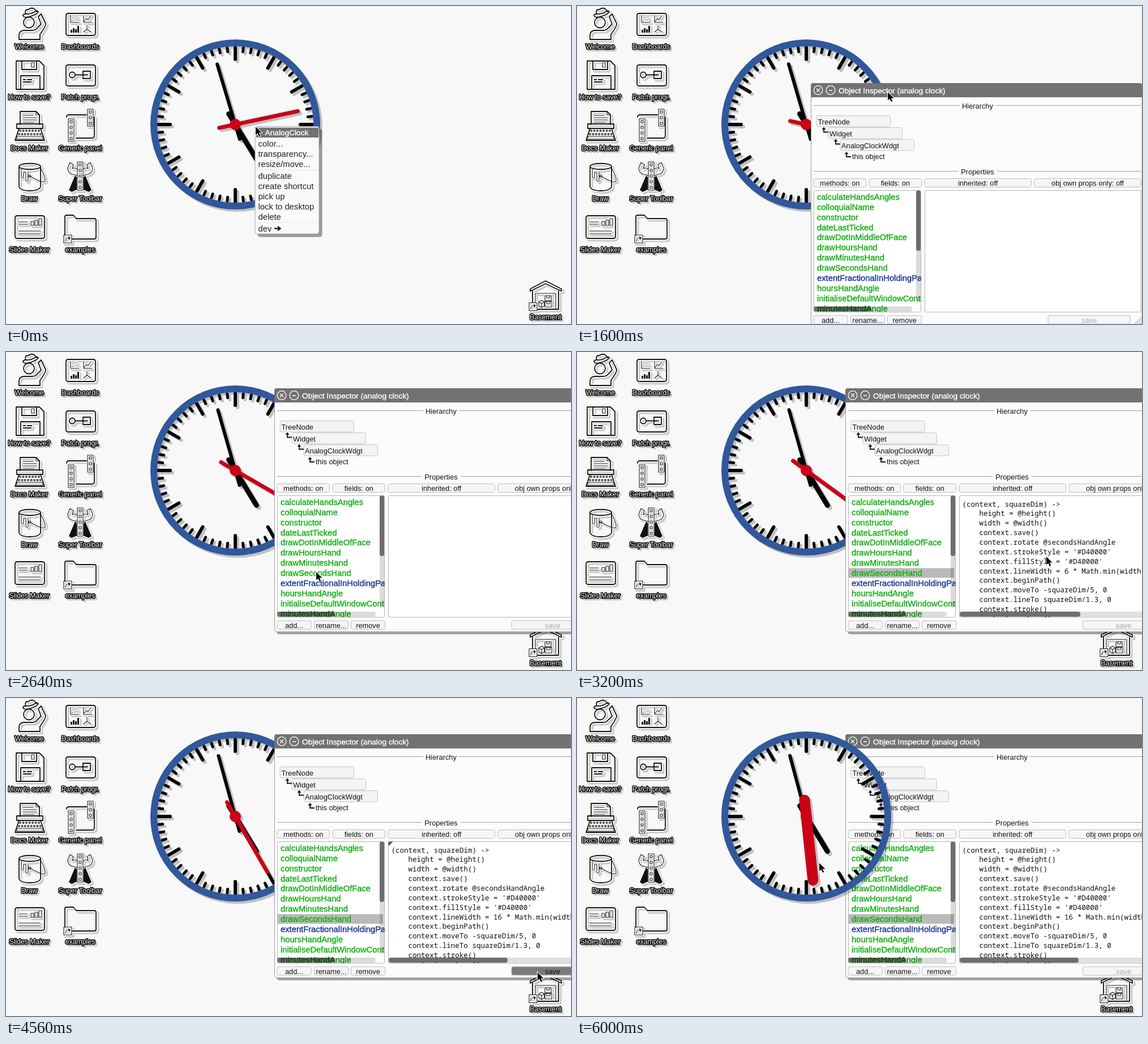
Animation, 998 px wide and 561 px high, one loop 6080 ms. Source, as an HTML page with a canvas:

```html
<!DOCTYPE html>
<html lang="en">
<head>
<meta charset="utf-8">
<title>Analog clock desktop</title>
<style>
html, body { margin: 0; width: 100%; height: 100%; overflow: hidden; background: #f8f8f8; }
canvas { display: block; }
</style>
</head>
<body>
<canvas id="stage" width="998" height="561"></canvas>
<script>
const W = 998, H = 561, LOOP = 6080, STEP = 80, TAU = Math.PI * 2;
const SANS = '"Liberation Sans", Arial, sans-serif';
const MONO = '"Noto Sans Mono", "DejaVu Sans Mono", monospace';
const stage = document.getElementById('stage').getContext('2d');

function makeLayer() {
  const c = document.createElement('canvas');
  c.width = W;
  c.height = H;
  return c.getContext('2d');
}
const scratch = makeLayer();

// Draws a group on its own layer, then places it with one hard shadow.
function withShadow(target, offset, alpha, draw) {
  scratch.clearRect(0, 0, W, H);
  scratch.save();
  draw(scratch);
  scratch.restore();
  target.save();
  target.shadowColor = `rgba(0,0,0,${alpha})`;
  target.shadowOffsetX = target.shadowOffsetY = offset;
  target.drawImage(scratch.canvas, 0, 0);
  target.restore();
}

function text(g, str, x, y, size, color = '#111', align = 'left', family = SANS) {
  g.font = `${size}px ${family}`;
  g.textAlign = align;
  g.fillStyle = color;
  g.fillText(str, x, y + size * 0.36);
}

// Text with slightly thickened stems.
function heavy(g, str, x, y, size, color, align) {
  text(g, str, x, y, size, color, align);
  g.strokeStyle = color;
  g.lineWidth = 0.4;
  g.strokeText(str, x, y + size * 0.36);
}

function panel(g, x, y, w, h, r, fill, edge) {
  g.beginPath();
  g.roundRect(x, y, w, h, r);
  g.fillStyle = fill;
  g.fill();
  if (edge) {
    g.strokeStyle = edge;
    g.lineWidth = 1;
    g.stroke();
  }
}

function line(g, x1, y1, x2, y2, width, color) {
  g.beginPath();
  g.moveTo(x1, y1);
  g.lineTo(x2, y2);
  g.lineWidth = width;
  g.strokeStyle = color;
  g.stroke();
}

function disc(g, x, y, r, color) {
  g.beginPath();
  g.arc(x, y, r, 0, TAU);
  g.fillStyle = color;
  g.fill();
}

// ---- Desktop icons ----
const box = (x, y, w, h) => `M${x} ${y}h${w}v${h}h${-w}z`;
const round = (x, y, w, h, r = 4) =>
  `M${x + r} ${y}h${w - 2 * r}q${r} 0 ${r} ${r}v${h - 2 * r}q0 ${r} ${-r} ${r}h${2 * r - w}q${-r} 0 ${-r} ${-r}v${2 * r - h}q0 ${-r} ${r} ${-r}z`;
const ring = (x, y, r) => `M${x - r} ${y}a${r} ${r} 0 1 0 ${2 * r} 0a${r} ${r} 0 1 0 ${-2 * r} 0z`;
const repeat = (n, f) => Array.from({ length: n }, (_, i) => f(i)).join('');
const strip = (x, y, n) => box(x, y, 10, n * 10) + repeat(n, i => box(x + 3, y + 3 + i * 10, 4, 4));
const badge = (x, y) => ({
  thin: box(x, y, 14, 14) + `M${x + 3} ${y + 11}q0 -6 6 -6`,
  fill: `M${x + 8} ${y + 2}l4 3l-3 4z`
});
const folderBadge = badge(102, 404), houseBadge = badge(924, 523.5);

const icons = [
  { name: 'Welcome', x: 41, y: 72,
    bold: 'M23 59V52Q23 44 31 43H46Q52 43 55 39L62 32L57 19L62 14L70 31Q71 35 60 50V59Z' + ring(40.5, 29, 9.5)
      + 'M35 14Q32 6 40 6Q44 2 50 5L54 10M30 17Q32 22 44 18T57 10Q55 7 51 10Q43 15 35 14Q30 14 30 17' },
  { name: 'Dashboards', x: 131, y: 72, bold: round(106, 13, 52, 39),
    thin: 'M114 16V29H129M137 16V29H152M138 27L142 22L145 24L150 17M143 34V41L137 46M143 41L150 46',
    fill: box(114, 42, 3, 5) + box(118, 39, 3, 8) + box(122, 41, 3, 6) + box(126, 35, 3, 12)
      + repeat(7, i => ring(117 + i * 1.7, 26 - (i * 5) % 9, 0.8)) },
  { name: 'How to save?', x: 41, y: 161, bold: 'M18 97H59L67 105V147H18ZM28 97V112H54V97M26 147V123H60V147',
    thin: box(45, 100, 5, 8), fill: box(30, 129, 5, 2) + box(37, 129, 9, 2) + box(30, 133, 15, 2) },
  { name: 'Patch progr.', x: 131, y: 161,
    bold: round(106, 104, 52, 37) + ring(117, 121.5, 5) + 'M122 121.5H144' + box(136, 115, 13, 13) },
  { name: 'Docs Maker', x: 41, y: 251,
    bold: 'M25 209V186H53L59 192V209M19 208H65V216H19ZM23 216L16 237H68L61 216',
    thin: 'M53 186V192H59M30 193H48M30 197H54M30 201H54M30 205H50' + box(19, 230, 46, 5)
      + repeat(7, i => ring(25 + i * 5.5, 220, 1.4)) + repeat(8, i => ring(23 + i * 5.4, 226, 1.4)) },
  { name: 'Generic panel', x: 131, y: 251, bold: 'M111 192H142M156 196V229Q156 233 152 233H124M107 196Q107 192 111 192',
    thin: strip(110, 199, 4) + strip(144, 182, 3) },
  { name: 'Draw', x: 41, y: 340,
    bold: 'M23 283V319Q26 326 42 326Q58 326 61 319V283M23 283C23 276 61 276 61 283C61 290 23 290 23 283Z',
    thin: 'M61 286Q70 301 69 309Q66 314 42 300M27 288V302Q29 305 31 302V294Q33 292 35 294V308Q37 311 39 308V292'
      + ring(42, 300, 2) },
  { name: 'Super Toolbar', x: 131, y: 340, thin: strip(126, 275, 5)
      + 'M126 288Q121 284 117 287L119 280L113 276L109 286Q109 295 118 297L126 299M136 288Q141 284 145 287L143 280L149 276L153 286Q153 295 144 297L136 299',
    fill: 'M122 299L125 302V324L116 328L111 325ZM140 299L137 302V324L146 328L151 325Z' },
  { name: 'Slides Maker', x: 41, y: 430, bold: round(16, 370, 52, 40),
    thin: 'M22 381H38M22 385H38M22 397H61M22 402H61' + box(44, 380, 5, 7) + box(51, 378, 5, 9) + box(58, 375, 5, 12) },
  { name: 'examples', x: 131, y: 430,
    bold: 'M104 404V372Q104 369 107 369H119L124 375H156Q159 375 159 378V408Q159 411 156 411H117', ...folderBadge },
  { name: 'Basement', x: 953, y: 548.5,
    bold: 'M926 503V499L953 485L981 499V503L953 490ZM930 503V523M976 503V535H939',
    thin: 'M935 523V507H971V533' + box(952, 511, 11, 9) + box(952, 521, 12, 10)
      + 'M955 511V515H960V511M955 521V525H961V521M941 522L946 519L951 522V529L946 532L941 529ZM941 522L946 525L951 522M946 525V532' + houseBadge.thin,
    fill: houseBadge.fill }
];

function drawIcon(g, icon) {
  g.lineJoin = g.lineCap = 'round';
  const bold = new Path2D(icon.bold || ''), thin = new Path2D(icon.thin || ''), fill = new Path2D(icon.fill || '');
  const ink = (path, width, color) => {
    g.strokeStyle = color;
    g.lineWidth = width;
    g.stroke(path);
  };
  ink(bold, 5, '#fff');
  ink(thin, 4, '#fff');
  ink(fill, 3, '#fff');
  ink(bold, 1.8, '#111');
  ink(thin, 1.1, '#111');
  g.fillStyle = '#111';
  g.fill(fill);
  g.font = `12.3px ${SANS}`;
  g.textAlign = 'center';
  g.lineWidth = 3;
  g.strokeStyle = '#000';
  g.strokeText(icon.name, icon.x, icon.y + 12.3 * 0.36);
  text(g, icon.name, icon.x, icon.y, 12.3, '#fff', 'center');
}

const desktop = makeLayer();
desktop.fillStyle = '#f8f8f8';
desktop.fillRect(0, 0, W, H);
withShadow(desktop, 3, 0.18, g => icons.forEach(i => drawIcon(g, i)));

// ---- Clock ----
function hand(g, turn, tail, tip, width, color) {
  g.save();
  g.rotate(turn * TAU - TAU / 4);
  line(g, -tail, 0, tip, 0, width, color);
  g.restore();
}

function drawClock(g, t) {
  const sec = 13 + Math.floor((t + 30) / 370);
  const min = 57 + sec / 60, hour = 4 + min / 60;
  g.translate(405, 209);
  g.lineCap = 'round';
  for (let i = 0; i < 60; i++) {
    const big = i % 5 === 0;
    hand(g, i / 60, big ? -115 : -129, 136, big ? 6 : 5, '#050505');
  }
  g.beginPath();
  g.arc(0, 0, 144, 0, TAU);
  g.lineWidth = 12;
  g.strokeStyle = '#30589b';
  g.stroke();
  hand(g, hour / 12, 22, 72, 9, '#050505');
  hand(g, min / 60, 27, 111, 6, '#050505');
  hand(g, sec / 60, 29, 113, t >= SAVED ? 19 : 7, '#ca0317');
  disc(g, 0, 0, 10, '#ca0317');
}

// ---- Timeline ----
const OPEN = 1120, GRAB = 1600, DROP = 1920, PICK = 2720, CARET = 3600,
  TYPE = 3920, PRESS = 4480, SAVED = 4640, RAISE = 5520;

const pointer = [
  [0, 441, 213], [80, 441, 213], [560, 493, 391], [720, 493, 391], [960, 515, 421], [OPEN, 515, 421],
  [1440, 549, 152], [GRAB, 549, 152], [DROP, 610, 80], [2080, 584, 174], [2480, 548, 388], [2800, 548, 388],
  [3200, 829, 361], [3440, 862, 386], [4000, 862, 386], [4400, 939, 484], [4720, 939, 484],
  [5360, 428, 291], [LOOP, 428, 291]
];

function pointerAt(t) {
  const i = pointer.findIndex(p => p[0] > t);
  const [t0, x0, y0] = pointer[i - 1], [t1, x1, y1] = pointer[i];
  const k = (t - t0) / (t1 - t0), e = k * k * (3 - 2 * k);
  return [x0 + (x1 - x0) * e, y0 + (y1 - y0) * e];
}

function drawPointer(g, x, y) {
  const p = new Path2D('M0 0V14.5L3.4 11.4L6 17L8.3 16L5.8 10.5H10.5Z');
  g.save();
  g.translate(x, y);
  g.lineWidth = 2;
  g.strokeStyle = '#fff';
  g.stroke(p);
  g.fillStyle = '#000';
  g.fill(p);
  g.restore();
}

// ---- Menus ----
const mainMenu = { title: 'AnalogClock', size: 13.7, x: 440, y: 212.5, w: 113, h: 189.5, rules: [289.5, 382],
  rows: [['color...', 243], ['transparency...', 261], ['resize/move...', 279], ['duplicate', 300],
    ['create shortcut', 318], ['pick up', 336], ['lock to desktop', 354], ['delete', 371.5], ['dev', 392.5]] };
const devMenu = { title: 'Dev Tools', size: 13, x: 492, y: 390.5, w: 69, h: 56, rules: [],
  rows: [['inspect', 420.5], ['console', 438]] };

function drawMenu(g, m, hover) {
  panel(g, m.x, m.y, m.w, m.h, 4, '#fafafa', '#a8a8a8');
  panel(g, m.x + 2, m.y + 2, m.w - 3, 17.5, [3, 3, 0, 0], '#727272');
  heavy(g, m.title, m.x + m.w / 2 - 0.5, m.y + 11, m.size, '#fff', 'center');
  m.rules.forEach(y => line(g, m.x + 2, y, m.x + m.w - 2, y, 1, '#e4e4e4'));
  for (const [label, y] of m.rows) {
    if (hover(label, y)) {
      g.fillStyle = '#bdbdbd';
      g.fillRect(m.x + 1, y - 8.5, m.w - 2, 17.5);
    }
    text(g, label, m.x + 5.5, y, 14.8, '#222');
    if (label === 'dev') {
      g.fillStyle = '#222';
      g.fill(new Path2D('M474 391.2H480V387.5L486.5 392.5L480 397.5V393.8H474Z'));
    }
  }
}

function drawMenus(t, py) {
  const sub = t >= 640;
  const over = y => py > y - 9 && py <= y + 9;
  withShadow(stage, 5, 0.38, g =>
    drawMenu(g, mainMenu, (label, y) => sub ? label === 'dev' : over(y)));
  if (sub) withShadow(stage, 5, 0.38, g => drawMenu(g, devMenu, (label, y) => over(y)));
}

// ---- Inspector window ----
const members = ['calculateHandsAngles', 'colloquialName', 'constructor', 'dateLastTicked', 'drawDotInMiddleOfFace',
  'drawHoursHand', 'drawMinutesHand', 'drawSecondsHand', 'extentFractionalInHoldingPanel', 'hoursHandAngle',
  'initialiseDefaultWindowContent', 'minutesHandAngle'];
const chain = [['TreeNode', 12.5], ['Widget', 33], ['AnalogClockWdgt', 54], ['this object', 73]];
const code = size => ['height = @height()', 'width = @width()', 'context.save()', 'context.rotate @secondsHandAngle',
  "context.strokeStyle = '#D40000'", "context.fillStyle = '#D40000'",
  `context.lineWidth = ${size} * Math.min(width, height)`, 'context.beginPath()', 'context.moveTo -squareDim/5, 0',
  'context.lineTo squareDim/1.3, 0', 'context.stroke()', 'context.restore()'];

function button(g, label, x, y, w, fill = '#f6f6f6', color = '#111') {
  panel(g, x, y - 7.5, w, 15, 3, fill, '#bcbcbc');
  text(g, label, x + w / 2, y + 0.5, 12.8, color, 'center');
}

function heading(g, label, y, left, right) {
  line(g, 5, y, left, y, 1, '#a0a0a0');
  line(g, right, y, 583, y, 1, '#a0a0a0');
  text(g, label, 294.5, y + 0.5, 12.8, '#111', 'center');
}

function clipped(g, x, y, w, h, draw) {
  panel(g, x, y, w, h, 2, '#fff', '#b4b4b4');
  g.save();
  g.beginPath();
  g.rect(x, y, w, h);
  g.clip();
  draw();
  g.restore();
}

function bars(g, list) {
  for (const [x, y, w, h, alpha] of list) panel(g, x, y, w, h, 4, `rgba(0,0,0,${alpha})`);
}

function drawHierarchy(g) {
  chain.forEach(([label, x], i) => {
    const y = 57.5 + i * 21;
    if (i < 3) panel(g, 10 + i * 21, y, 130.5, 19.5, 3, '#f4f4f4', '#c4c4c4');
    text(g, label, x, i < 3 ? y + 10.5 : 129.5, 12.8);
    if (i) {
      g.save();
      g.translate(x - 10, i < 3 ? y + 5 : 127);
      g.strokeStyle = '#111';
      g.lineWidth = 1.8;
      g.stroke(new Path2D('M0 -2V3H8'));
      g.fillStyle = '#111';
      g.fill(new Path2D('M-3.5 -1.5L0 -6L3.5 -1.5Z'));
      g.restore();
    }
  });
}

function drawList(g, picked) {
  members.forEach((name, i) => {
    const y = 200.5 + i * 17.9;
    if (picked && i === 7) {
      g.fillStyle = '#bababa';
      g.fillRect(6, y - 8.5, 186, 17);
    }
    heavy(g, name, 11, y, 14.75, i === 8 ? '#1b378f' : '#0fae0f');
  });
  bars(g, [[186, 189, 8, 198, 0.14], [186, 189, 8, 107, 0.5], [5, 394, 174, 9, 0.14], [5, 394, 102, 9, 0.5]]);
}

function drawCode(g, t) {
  const typed = t >= TYPE, put = (str, x, row) => text(g, str, x, 204 + row * 16.87, 12.55, '#111', 'left', MONO);
  put('(context, squareDim) ->', 206.5, 0);
  code(typed ? 16 : 6).forEach((str, i) => put(str, 236.5, i + 1));
  if (t >= CARET && t < PRESS) {
    const x = 236.5 + 7.53 * (typed ? 21 : 20);
    line(g, x, 314, x, 329, 1, '#111');
  }
  if (typed && t < SAVED) {
    g.fillStyle = '#555';
    g.fill(new Path2D('M201 189H210L201 198Z'));
  }
  bars(g, [[202, 394, 370, 9, 0.12], [202, 394, typed ? 210 : 213, 9, 0.5]]);
}

function drawWindow(g, t, x, y) {
  g.translate(x, y);
  panel(g, 0.5, 0.5, 584.5, 429, 4, '#fcfcfc', '#9c9c9c');
  panel(g, 0, 0, 585, 25, [4, 4, 0, 0], '#727272');
  g.strokeStyle = '#fff';
  g.lineWidth = 1.3;
  g.stroke(new Path2D(ring(13, 12.5, 7.8) + 'M10 9.5L16 15.5M16 9.5L10 15.5' + ring(35, 12.5, 7.8) + 'M32 13H38'));
  heavy(g, 'Object Inspector (analog clock)', 49, 13, 13.7, '#fff');
  heading(g, 'Hierarchy', 39.5, 263, 326);
  drawHierarchy(g);
  heading(g, 'Properties', 155.5, 260, 329);
  button(g, 'methods: on', 5, 176, 92.5);
  button(g, 'fields: on', 103, 176, 92.5);
  button(g, 'inherited: off', 201, 176, 188.5);
  button(g, 'obj own props only: off', 395, 176, 188);
  clipped(g, 5.5, 189.5, 189, 214.5, () => drawList(g, t >= PICK));
  clipped(g, 201.5, 189.5, 381.5, 214.5, () => { if (t >= PICK) drawCode(g, t); });
  button(g, 'add...', 5, 417.5, 60);
  button(g, 'rename...', 70.5, 417.5, 60);
  button(g, 'remove', 135.5, 417.5, 60);
  const dirty = t >= TYPE && t < SAVED;
  button(g, 'save', 419, 417.5, 145, dirty && t >= PRESS ? '#7a7a7a' : '#f6f6f6', dirty ? '#111' : '#aaa');
  for (let d = 4; d < 14; d += 4) line(g, 584 - d, 425, 584, 425 - d, 1, '#888');
}

// ---- Frame ----
function render(t) {
  const [px, py] = pointerAt(t);
  stage.drawImage(desktop.canvas, 0, 0);
  const clock = () => withShadow(stage, 4, 0.22, g => drawClock(g, t));
  if (t < RAISE) clock();
  if (t < OPEN) drawMenus(t, py);
  else {
    let x = 413, y = 136;
    if (t >= DROP) { x = 474; y = 64; }
    else if (t > GRAB) { x += Math.round(px - 549); y += Math.round(py - 152); }
    withShadow(stage, 4, 0.35, g => drawWindow(g, t, x, y));
  }
  if (t >= RAISE) clock();
  drawPointer(stage, px, py);
}

const start = performance.now();
function tick() {
  const t = Math.max(0, performance.now() - start) % LOOP;
  render(Math.floor(t / STEP) * STEP);
  requestAnimationFrame(tick);
}
tick();
</script>
</body>
</html>
```
